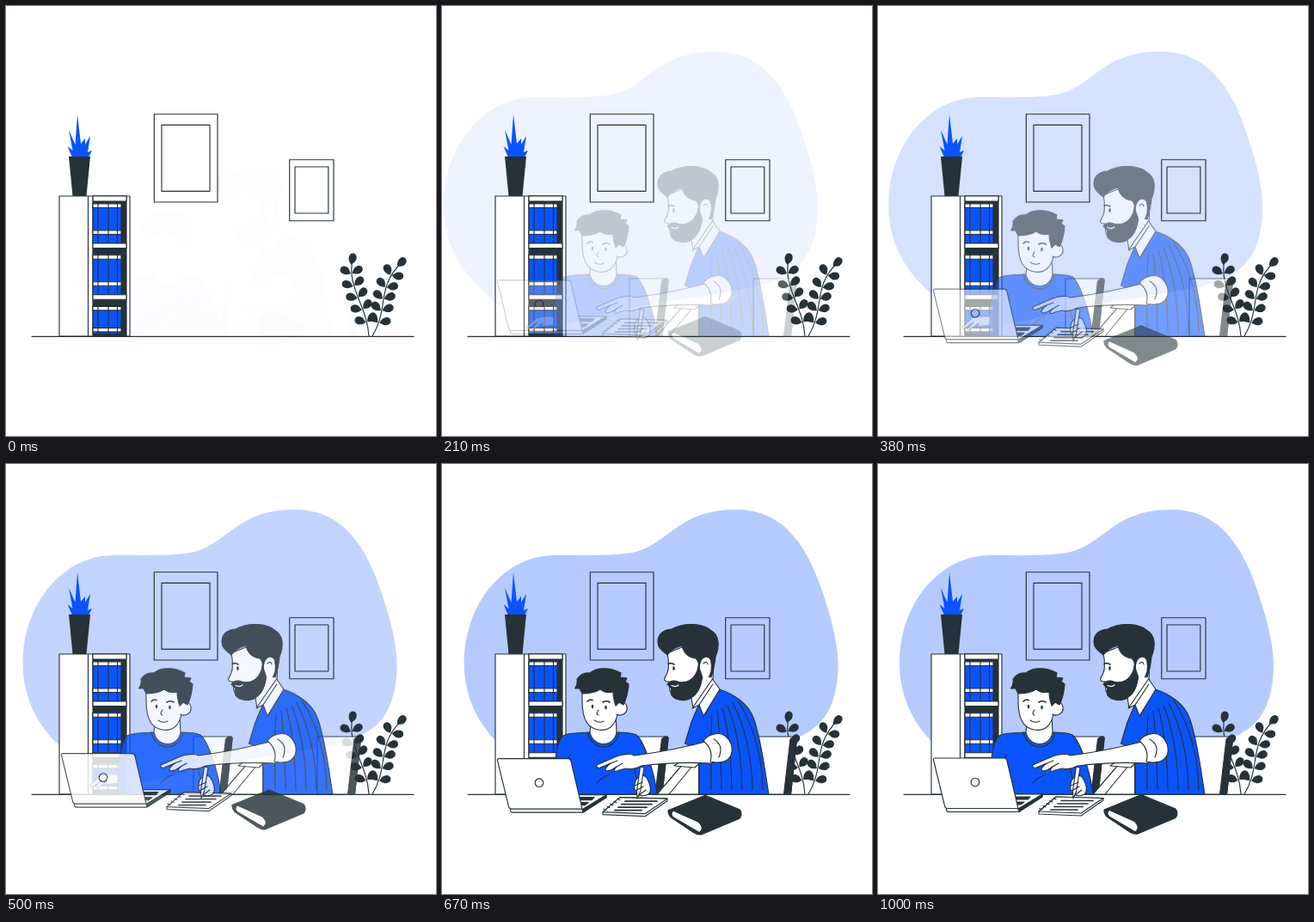
These frames come from a looping animation (500x500 px, 1.04 s). An HTML page:

```html
<!DOCTYPE html>
<html lang="en">
<head>
<meta charset="utf-8">
<title>Study at home</title>
<style>
html, body { margin: 0; height: 100%; overflow: hidden; background: #fff; }
svg { display: block; width: 100vw; height: 100vh; }
path, rect, circle, ellipse { stroke: #263238; stroke-width: 1.15; fill: #fff; stroke-linejoin: round; stroke-linecap: round; }
.line { fill: none; }
.ink { fill: #263238; }
.blue { fill: #0a54ff; }
.flat { stroke: none; }
.bold { stroke-width: 1.7; }
.fade { opacity: 0; }
</style>
</head>
<body>
<svg viewBox="0 0 500 500">
  <g class="fade" id="blob">
    <path class="blue flat" opacity=".3" d="M25 232C25 162 72 106 131 106C165 106 190 107 215 104C262 98 270 53 341 53C400 53 428 100 447 165C456 195 460 215 460 236C458 297 432 314 392 325C340 338 250 345 200 362C125 385 90 352 62 322C40 300 25 268 25 232Z"/>
  </g>

  <!-- wall frames -->
  <rect class="line" x="172.300" y="125.700" width="73.700" height="102.300"/>
  <rect class="line" x="181" y="138.300" width="56" height="77"/>
  <rect class="line" x="329.700" y="178.700" width="51.300" height="71"/>
  <rect class="line" x="336" y="187" width="38.800" height="54"/>

  <!-- potted plant -->
  <path class="blue flat" d="M77 176L71.500 163L77.500 168L73 144L80.500 161L83 126L87 160L92 154V161L98 151L95 170L100 168L96 176Z"/>
  <path class="ink flat" d="M73 175H98L93.500 221H77.500Z"/>

  <!-- bookcase -->
  <path d="M62 221H144V384H62ZM95.500 221V384"/>
  <path class="ink" d="M101 221H140V384H101Z"/>
  <path d="M101 221H140V227H101Z"/>
  <g id="books"></g>

  <path class="line" d="M30 384.300H474"/>
  <g id="plant"></g>
  <g class="fade" id="chairs"></g>

  <!-- boy -->
  <g class="fade">
    <path d="M146 365C135 361 126 360 118 361L109 363L98 373Q98 376 101 375L111 368L104 375Q105 378 109 375L117 369L115 373L146 369Z"/>
    <path class="blue" d="M172 312C160 313 147 312 141 316C134 321 130 345 130 384H250C247 358 235 322 226 315C220 312 210 312 203 312Z"/>
    <path d="M173 302L172 312C176 330 200 330 203 312L202 292Z"/>
    <path class="line" d="M169 312C175 335 202 334 206 312M222 350L226 364M144 344L150 338M180 371Q186 364 195 361"/>
    <path d="M163 258C163 275 162 290 168 300C174 310 188 312 196 306C201 302 203 296 204 291V260Z"/>
    <path d="M202 281C206 274 214 276 215 283C216 290 208 294 203 291"/>
    <path class="ink" d="M163 267L160 261L154.500 261Q158 256 157 250Q163 242 172 243C180 236 196 236 208 243L207 248L215 249L213 253L217 256Q216 270 211 280L206 277L202 281Q199 272 199 265Q190 267 184 262Q176 267 163 267Z"/>
    <path class="line" d="M182 286Q178 291 182 292M177 298Q183 302 188 299"/>
    <path class="line bold" d="M169 276Q172 273 175 274.500M187 277Q191 274.500 195 277"/>
    <ellipse class="ink flat" cx="175" cy="282" rx="1.300" ry="2.300"/>
    <ellipse class="ink flat" cx="190.500" cy="283" rx="1.300" ry="2.300"/>
  </g>

  <!-- man -->
  <g class="fade">
    <path d="M281 348L250 384H298.500V350ZM292 350L264 384"/>
    <path d="M270 351Q279 344 285 344L299 348L294 353Z"/>
    <path class="blue" d="M299 279L290 300L282.500 325L299 332V384H380C376 360 373 335 367 312C363 293 358 284 347 275Q336 266 322 262L305 293Z"/>
    <g id="stripes"></g>
    <path d="M262 220Q265 235 262 243L258.500 250Q259 253.500 264 253L265 264Q274 275 290 272L292 284L315 252L316 225L298 205Z"/>
    <path d="M291 284L314.500 250L323 262L304 293L299 280ZM299 280L315 256"/>
    <path class="ink" d="M262 256Q267 250 274 253C284 256 293 251 297 240L300 225L303 244C302 256 299 266 291 271C284 277 271 275 267 269Q265 264 267 261Z"/>
    <path class="line" style="stroke:#fff" d="M267 257.500Q272 260 275 257"/>
    <path class="ink" d="M262 222C258 218 251 215 251 207C251 198 256 193 267 192C280 184 304 185 312 193C323 199 323 212 318 224Q317 235 313 248L303 246L298 240Q300 230 295 226Q282 224 279 211Q268 214 262 222Z"/>
    <path class="flat" d="M300 238C299 226 308 221 312 228Q315 242 308 250L303 247Z"/>
    <path class="line" d="M304 232Q308 228 309 233"/>
    <path class="line bold" d="M263 232.500Q266 230.500 270 233"/>
    <ellipse class="ink flat" cx="269.500" cy="237.500" rx="1.300" ry="2.500"/>
    <path d="M314 321Q270 333 224 339C218 336 208 338 203 340L180 350Q179 354 184 353L196 348C190 353 188 356 192 357Q196 357 203 352C198 357 201 359 206 356L214 354Q222 356 232 351Q270 346 314 348Z"/>
    <path class="line" d="M196 348L204 345M203 352L210 348"/>
    <path d="M304 322C309 314 322 311 329 316C338 323 340 336 333 343Q326 349 312 346Q316 332 304 322Z"/>
    <path class="line" d="M316 320Q328 327 322 341"/>
  </g>

  <!-- things on the table -->
  <g class="fade" id="desk">
    <path d="M150 384H191V387L163 404.500H82Q79 404.500 79.500 400Z"/>
    <path class="ink" d="M163 401L191 384V387L164 404.500Z"/>
    <path class="ink" d="M160 387H177L174 390H161ZM162 393H170L166 396H163Z"/>
    <path d="M66 342H146.500Q149.500 342 150 345L163 400.500H81Q78 400.500 77.500 397.500L64.500 344Q64 342 66 342Z"/>
    <circle cx="113" cy="370" r="4.800"/>

    <path d="M207 387L262 388.500V391L236 409L187 407V404Z"/>
    <path d="M207 387L262 388.500L236 406L187 404Z"/>
    <g id="notes"></g>

    <path class="ink" d="M263 402L306 384.500L346 401Q350 406 346 411.500L302 430Q298 431 293 428L266 410Q262.500 406 263 402Z"/>
    <path class="flat" d="M269 403L298 416Q305 423 299 427L269 409.500Q266 406 269 403Z"/>
  </g>

  <!-- writing hand -->
  <g class="fade">
    <path d="M225 368C228 363 235 360 238 365C242 372 244 380 240 384Q233 388 226 383Q222 378 225 368Z"/>
    <path d="M230.500 352L235 353L230.500 381L227 389L226.500 380Z"/>
    <path class="line" d="M224 374L233 370M225 380L234 375M229 385L237 379"/>
  </g>
</svg>
<script>
const $ = id => document.getElementById(id);
const repeat = (n, make) => Array.from({ length: n }, (_, i) => make(i)).join('');
const path = (cls, d, extra = '') => `<path class="${cls}" d="${d}" ${extra}/>`;

// three equal shelves; the lowest one is cut by the floor
$('books').innerHTML = repeat(3, i => {
  const top = 229 + 59.7 * i, h = i < 2 ? 47 : 33;
  const label = y => path('', `M101 ${y}h33v4.500h-33Z`);
  return path('blue', `M101 ${top}h33v${h}h-33Z`) + label(top + 1) + label(top + (i < 2 ? 32 : 26))
    + path('line', `M107 ${top}v${h}M119 ${top}v${h}M129.500 ${top}v${h}`)
    + (i < 2 ? path('', `M101 ${top + h}h39v5.500h-39Z`) : '');
});

// a stem is a cubic curve with pairs of leaves set square to it
function stem(x0, y0, x1, y1, x2, y2, x3, y3) {
  const at = (t, a, b, c, d) => a * (1 - t) ** 3 + 3 * b * t * (1 - t) ** 2 + 3 * c * t * t * (1 - t) + d * t ** 3;
  const point = t => [at(t, x0, x1, x2, x3), at(t, y0, y1, y2, y3)];
  function leaf(t, side) {
    const [x, y] = point(t), [px, py] = point(t - .02);
    const dir = Math.atan2(y - py, x - px);
    const lx = x - 7 * side * Math.sin(dir), ly = y + 7 * side * Math.cos(dir);
    return path('ink flat', 'M-7 0C-4 -4 1 -6 5 -3.500C8 0 6 4.500 1 4.500C-3 4.500 -4 2 -7 0Z',
      `transform="translate(${lx} ${ly})rotate(${dir * 180 / Math.PI + 60 * side})"`);
  }
  return path('line', `M${x0} ${y0}C${x1} ${y1} ${x2} ${y2} ${x3} ${y3}`)
    + repeat(5, i => leaf(.2 + .165 * i, -1) + leaf(.2 + .165 * i, 1)) + leaf(1, 0);
}
$('plant').innerHTML = stem(422, 384, 420, 348, 396, 328, 403, 294) + stem(426, 384, 446, 350, 430, 328, 460, 298);

const chair = (left, right) =>
  path('', `M${left} 317H${right - 2}q2.500 0 2 3L${right - 7} 384H${left}Z`)
  + path('ink', `M${right - 4} 317h2q2.500 0 2 3l-7 64h-8l7.500 -64Z`);
$('chairs').innerHTML = chair(218, 263) + chair(362, 412.5);

$('stripes').innerHTML = repeat(6, i =>
  path('line', `M${314 + 6 * i} ${290 - 3 * i}Q${312 + 12 * i} 320 ${313 + 12 * i} 379`));

$('notes').innerHTML =
  repeat(4, i => path('line bold', `M${213 - 4 * i} ${391.5 + 3.5 * i}h${37 - 2 * i}`))
  + repeat(5, i => path('line', `M${191 + 4 * i} ${402 - 3 * i}l-3 -1.500`));

const LOOP = 1040, STEP = 1000 / 24;
const bez = (s, a, b) => 3 * (1 - s) ** 2 * s * a + 3 * (1 - s) * s * s * b + s ** 3;

// cubic-bezier(.36, -.01, .5, 1.38): overshoots, then settles
function ease(x) {
  if (x >= 1) return 1;
  let lo = 0, hi = 1;
  for (let i = 0; i < 24; i++) {
    const mid = (lo + hi) / 2;
    if (bez(mid, .36, .5) < x) lo = mid; else hi = mid;
  }
  return bez(lo, -.01, 1.38);
}

const fades = document.querySelectorAll('.fade');
const start = performance.now();

function draw() {
  const t = (performance.now() - start) % LOOP;
  // 24 pictures a second, each showing the pose at its end
  const p = ease(Math.floor((t + 5) / STEP + 1) * STEP / 1000);
  const shift = 30 * (p - 1);
  for (const g of fades) g.style.opacity = Math.max(0, Math.min(1, p));
  $('blob').setAttribute('transform', `translate(${shift} 0)`);
  $('desk').setAttribute('transform', `translate(0 ${shift})`);
  requestAnimationFrame(draw);
}
draw();
</script>
</body>
</html>
```
